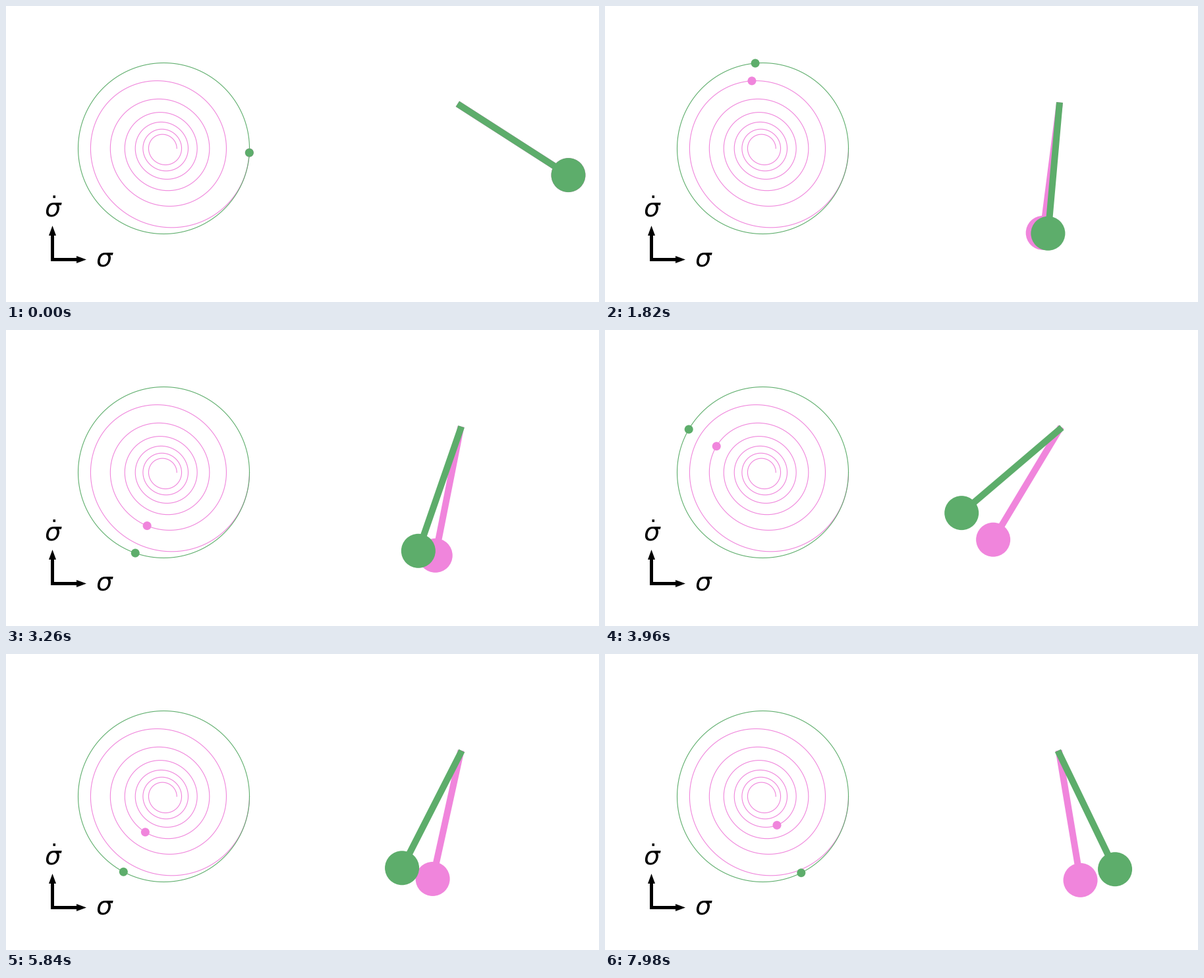
These frames come from a looping animation (900x450 px, 8000 ms). A matplotlib script:

```python
import numpy as np
import matplotlib.pyplot as plt
from matplotlib.animation import FuncAnimation
from matplotlib.patches import Circle, Polygon

W, H, DPI = 900, 450, 100
FRAMES, INTERVAL = 400, 20
PX = 72 / DPI                      # one pixel in points

UNIT = 130                         # pixels per unit
CENTER = (239.5, 216.5)            # origin of the phase plane
PIVOT = (689.5, 151.5)
ROD = 1.5 * UNIT

GREEN, PINK = "#5dad6b", "#f085dc"

CYCLE = 126                        # frames per undamped cycle, both ends included
STEP = 2 * np.pi / (CYCLE - 1)
DAMPED_STEP = STEP * np.sqrt(0.99)
ZETA = 0.05


def undamped(phase):
    return np.cos(phase), -np.sin(phase)


def damped(phase):
    decay = np.exp(-ZETA * phase)
    return (decay * (np.cos(phase) + ZETA * np.sin(phase)),
            -decay * np.sin(phase))


def to_plane(pos, vel):
    return CENTER[0] + UNIT * pos, CENTER[1] - UNIT * vel


fig = plt.figure(figsize=(W / DPI, H / DPI), dpi=DPI, facecolor="white")
ax = fig.add_axes([0, 0, 1, 1])
ax.set_xlim(0, W)
ax.set_ylim(H, 0)
ax.axis("off")


class Oscillator:
    """A phase-plane orbit with its marker and the matching pendulum."""

    def __init__(self, motion, turns, color, z):
        self.motion = motion
        orbit = to_plane(*motion(np.linspace(0, 2 * np.pi * turns, 160 * turns + 1)))
        ax.plot(*orbit, color=color, lw=1.1 * PX, zorder=z)
        self.rod, = ax.plot([], [], color=color, lw=10 * PX,
                            solid_capstyle="projecting", zorder=z + 2)
        self.dot = ax.add_patch(Circle(CENTER, 0.05 * UNIT, color=color, lw=0, zorder=z + 2))
        self.bob = ax.add_patch(Circle(PIVOT, 0.2 * UNIT, color=color, lw=0, zorder=z + 2))

    def move(self, phase):
        pos, vel = self.motion(phase)
        self.dot.center = to_plane(pos, vel)
        x = PIVOT[0] + ROD * np.sin(pos)
        y = PIVOT[1] + ROD * np.cos(pos)
        self.rod.set_data([PIVOT[0], x], [PIVOT[1], y])
        self.bob.center = (x, y)

    def artists(self):
        return [self.rod, self.dot, self.bob]


def arrow(direction):
    along = np.array(direction)
    across = np.array([along[1], along[0]])
    outline = [(-2.5, -2.5), (36.5, -2.5), (36.5, -5.5), (51.5, 0),
               (36.5, 5.5), (36.5, 2.5), (-2.5, 2.5)]
    points = [np.array([70.5, 385.5]) + a * along + b * across for a, b in outline]
    ax.add_patch(Polygon(points, closed=True, color="black", lw=0))


arrow((1, 0))
arrow((0, -1))
ax.text(136.5, 396, r"$\sigma$", fontsize=28)
ax.text(58.5, 320.5, r"$\dot{\sigma}$", fontsize=28)

free = Oscillator(undamped, 1, GREEN, 3)
lossy = Oscillator(damped, 6, PINK, 2)


def update(frame):
    n = frame + 1
    free.move(n % CYCLE * STEP)
    lossy.move(n * DAMPED_STEP)
    return lossy.artists() + free.artists()


anim = FuncAnimation(fig, update, frames=FRAMES, interval=INTERVAL,
                     init_func=lambda: update(0), repeat=True, repeat_delay=0)
plt.show()
```
